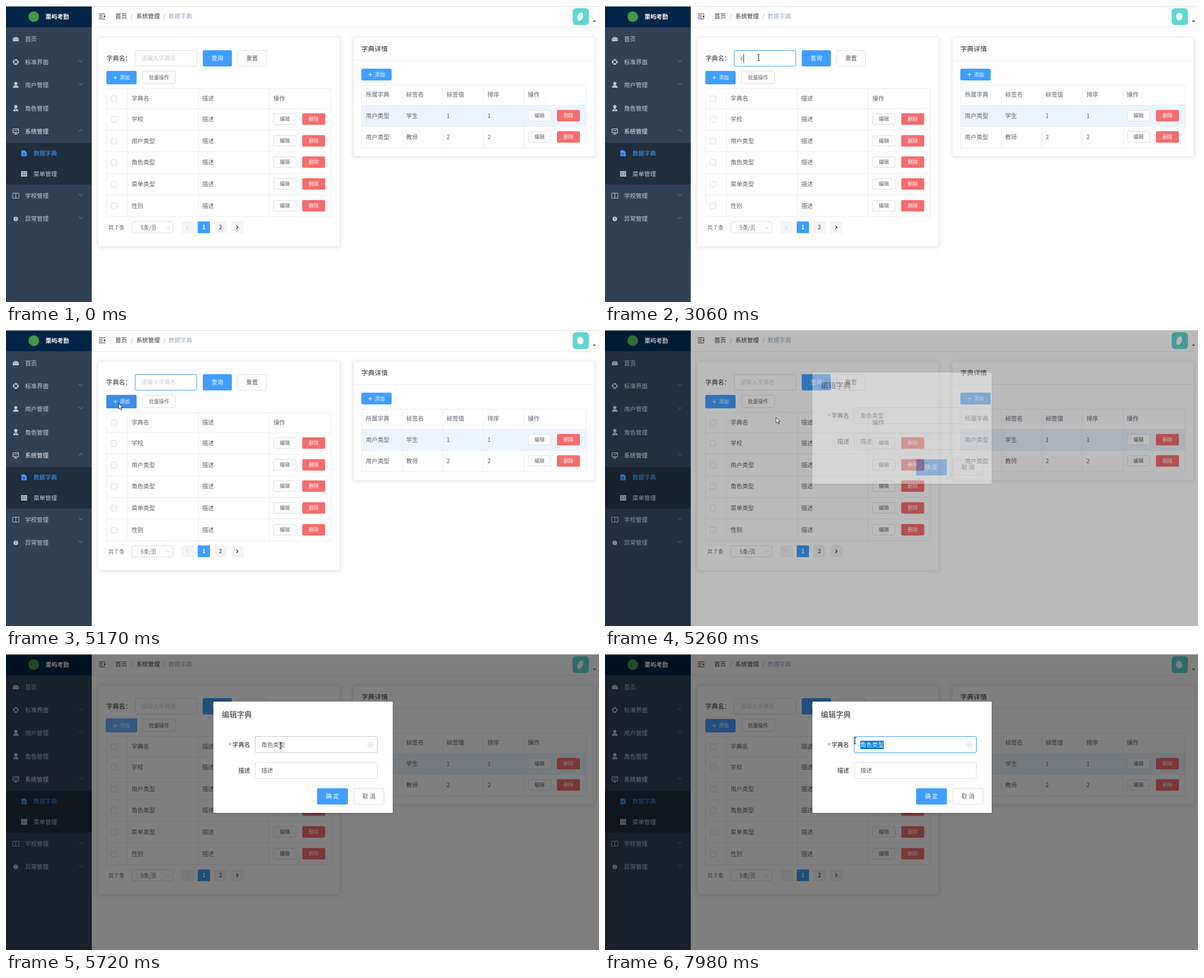
Animation, 1058 px wide and 529 px high, one loop 8000 ms. Source, as an HTML page:

```html
<!DOCTYPE html>
<html lang="zh">
<head>
<meta charset="utf-8">
<title>数据字典</title>
<style>
html, body { margin: 0; width: 100%; height: 100%; overflow: hidden; background: #fff; }
svg { display: block; width: 100%; height: 100vh; }
text { font-family: "Noto Sans CJK SC", "Noto Sans CJK", "Noto Sans", sans-serif; white-space: pre; }
.b { font-weight: 700; }
.m { text-anchor: middle; }
.card { filter: drop-shadow(0 1px 4px rgba(0, 0, 0, .12)); }
.panel { filter: drop-shadow(0 1px 1.5px rgba(0, 0, 0, .3)); }

.pointer, .arrow, .beam, .focus, .typed, .hint, .caret-a, .caret-b, .press, .held,
.shade, .dialog, .clear, .hover, .active, .marked { animation: 8s step-end infinite; }
.arrow, .beam, .focus, .typed, .caret-a, .caret-b, .press, .held,
.shade, .dialog, .clear, .hover, .active, .marked { opacity: 0; }

.pointer { animation-name: move; }
@keyframes move {
  0% { transform: translate(166px, 425px); }
  1.17% { transform: translate(166px, 425px); animation-timing-function: steps(7); }
  9.39% { transform: translate(274px, 92px); }
  54% { transform: translate(274px, 92px); animation-timing-function: steps(7); }
  62.25% { transform: translate(201px, 131px); }
  65.7% { transform: translate(305px, 156px); }
  67.05% { transform: translate(406px, 173px); }
  68.3% { transform: translate(455px, 170px); }
  69.5% { transform: translate(478px, 167px); }
  70.7% { transform: translate(490px, 164px); }
  75.2% { transform: translate(490px, 164px); animation-timing-function: steps(4); }
  80% { transform: translate(520px, 166px); }
  86% { transform: translate(520px, 166px); animation-timing-function: steps(6); }
  93% { transform: translate(503px, 160px); }
  95.1% { transform: translate(503px, 160px); animation-timing-function: steps(3); }
  98.7%, 100% { transform: translate(446px, 155px); }
}
.arrow { animation-name: arrow; }
@keyframes arrow { 0%, 9.39%, 68.3%, 100% { opacity: 0; } 1.17%, 57.5% { opacity: 1; } }
.beam { animation-name: beam; }
@keyframes beam { 0%, 57.5% { opacity: 0; } 9.39%, 68.3%, 100% { opacity: 1; } }

.focus { animation-name: focus; }
@keyframes focus { 0%, 65.7%, 100% { opacity: 0; } 12.9% { opacity: 1; } }
.typed { animation-name: typed; }
@keyframes typed { 0%, 46.3%, 100% { opacity: 0; } 23.4% { opacity: 1; } }
.hint { animation-name: hint; }
@keyframes hint { 0%, 46.3%, 100% { opacity: 1; } 23.4% { opacity: 0; } }
.caret-a { animation-name: caret-a; }
@keyframes caret-a { 0%, 19.4%, 52.8%, 100% { opacity: 0; } 12.9%, 46.3% { opacity: 1; } }
.caret-b { animation-name: caret-b; }
@keyframes caret-b { 0%, 30%, 43.2%, 100% { opacity: 0; } 23.4%, 36.6% { opacity: 1; } }

.press { animation-name: press; }
@keyframes press { 0%, 65.7%, 100% { opacity: 0; } 62.25% { opacity: 1; } }
.held { animation-name: held; }
@keyframes held { 0%, 95.1%, 100% { opacity: 0; } 67.05% { opacity: 1; } }

.shade { animation-name: shade; }
@keyframes shade {
  0% { opacity: 0; }
  65.7% { opacity: .27; }
  67.05% { opacity: .465; }
  68.3%, 100% { opacity: .5; }
}
.dialog { animation-name: dialog; }
@keyframes dialog {
  0% { opacity: 0; transform: translateY(-15px); }
  65.7% { opacity: .39; transform: translateY(-9px); }
  67.05% { opacity: .81; transform: translateY(-3px); }
  68.3% { opacity: .97; transform: translateY(-.5px); }
  69.5%, 100% { opacity: 1; transform: none; }
}
.clear, .hover { animation-name: clear; }
@keyframes clear { 0% { opacity: 0; } 68.3%, 100% { opacity: 1; } }
.active { animation-name: active; }
@keyframes active { 0% { opacity: 0; } 95.1%, 100% { opacity: 1; } }
.marked { animation-name: marked; }
@keyframes marked {
  0% { opacity: 0; clip-path: inset(0 0 0 75%); }
  96.3% { opacity: 1; clip-path: inset(0 0 0 75%); }
  97.5% { opacity: 1; clip-path: inset(0 0 0 25%); }
  98.7%, 100% { opacity: 1; clip-path: inset(0); }
}

.figure { transform-box: fill-box; transform-origin: center; animation: sway calc(8s / 17) step-end infinite; }
@keyframes sway {
  0%, 100% { transform: rotate(22deg); }
  20% { transform: rotate(8deg) scale(1.25, .85); }
  60% { transform: rotate(-8deg) scale(1.25, .85); }
}
</style>
</head>
<body>
<svg id="stage" viewBox="0 0 1058 529" preserveAspectRatio="none"></svg>
<script>
const BLUE = '#409eff', RED = '#f56c6c', TEXT = '#606266', DARK = '#303133',
      GREY = '#909399', LINE = '#ebeef5', EDGE = '#dcdfe6', MENU = '#bfcbd9';

const text = (x, y, s, fill = TEXT, size = 10.5, cls = '') =>
  `<text x="${x}" y="${y + size * .37}" font-size="${size}" fill="${fill}" class="${cls}">${s}</text>`;
const rect = (x, y, w, h, fill, r = 0, cls = '') =>
  `<rect x="${x}" y="${y}" width="${w}" height="${h}" rx="${r}" fill="${fill}" class="${cls}"/>`;
const frame = (x, y, w, h, edge = EDGE, r = 2.5, fill = '#fff', cls = '') =>
  `<rect x="${x + .5}" y="${y + .5}" width="${w - 1}" height="${h - 1}" rx="${r}" fill="${fill}" stroke="${edge}" class="${cls}"/>`;
const stroke = (d, color, width = 1, extra = '') =>
  `<path d="${d}" fill="none" stroke="${color}" stroke-width="${width}" ${extra}/>`;
const shape = (d, fill) => `<path d="${d}" fill="${fill}"/>`;
const dot = (x, y, r, fill) => `<circle cx="${x}" cy="${y}" r="${r}" fill="${fill}"/>`;
const group = (cls, ...parts) => `<g class="${cls}">${parts.join('')}</g>`;

const button = (x, y, w, h, s, fill, size = 10.5) =>
  (fill ? rect(x, y, w, h, fill, 2.5) : frame(x, y, w, h)) +
  text(x + w / 2, y + h / 2, s, fill ? '#fff' : TEXT, size, 'm');
const addLabel = (x, y) =>
  stroke(`M${x + 12.5} ${y}h7m-3.5-3.5v7`, '#fff', .9) + text(x + 24, y, '添加', '#fff', 9);
const rowButtons = (x, y) =>
  button(x, y - 10, 41, 20, '编辑', '', 9) + button(x + 51.5, y - 10.3, 41, 20.6, '删除', RED, 9);
const chevron = (x, y, dy, color, s = 3.5) =>
  stroke(`M${x - s} ${y - dy / 2}l${s} ${dy}l${s} ${-dy}`, color, .9);
const grid = (xs, ys) => {
  const left = xs[0], top = ys[0], w = xs.at(-1) - left + 1, h = ys.at(-1) - top + 1;
  return xs.map(x => rect(x, top, 1, h, LINE)).join('') + ys.map(y => rect(left, y, w, 1, LINE)).join('');
};

function sidebar() {
  const icons = {
    59: shape('M12.5 63a5.5 5.5 0 1 1 10 0z', MENU) + dot(15, 60, .8, '#304156') +
        dot(17.5, 57, .8, '#304156') + dot(20, 60, .8, '#304156'),
    100: `<circle cx="17.5" cy="100" r="3.8" fill="none" stroke="${MENU}" stroke-width="2.6" stroke-dasharray="4.97 1" stroke-dashoffset="2.5"/>`,
    141: dot(17.5, 138.5, 2.8, MENU) + shape('M12.5 146c0-6 10-6 10 0z', MENU),
    183: dot(17.5, 181, 2.4, MENU) + rect(14, 179, 7, 1.2, MENU) + rect(15.5, 177, 4, 2, MENU) +
         shape('M13 188c0-6 9-6 9 0z', MENU) + rect(17, 184, 1, 3, '#304156'),
    224: stroke('M12.5 219.5h10v7h-10zM17.5 226.5v2.5M14.5 229h6M14.5 224l2-2 2 1.5 2.5-3', '#f4f4f5', .9),
    339: stroke('M12 334.5h5.5v9H12zM17.5 334.5H23v9h-5.5z', MENU, .9),
    380: dot(17.5, 380.5, 4, MENU) + rect(17, 378, 1.1, 3, '#304156') + rect(17, 382, 1.1, 1.1, '#304156'),
  };
  const items = [[59, '首页'], [100, '标准界面', 1], [141, '用户管理', 1], [183, '角色管理'],
    [224, '系统管理', -1], [339, '学校管理', 1], [380, '异常管理', 1]];
  let out = rect(0, 0, 153, 529, '#304156') + rect(0, 0, 153, 38, '#012547') +
    dot(49.5, 19, 9.5, '#43974a') + text(70.5, 19, '栗屿考勤', '#fff', 10.5, 'b') +
    rect(0, 245, 153, 74, '#1f2d3d');
  for (const [y, name, fold] of items) {
    out += icons[y] + text(34, y, name, fold < 0 ? '#f4f4f5' : MENU);
    if (fold) out += chevron(133.5, y - 1.5, fold * 3.2, '#8592a2');
  }
  out += shape('M27.5 258h6l3.5 3.5v7h-9.5z', BLUE) + stroke('M29.5 263.5h5m-5 2.5h5', '#1f2d3d', .9) +
    text(49, 263.5, '数据字典', BLUE) + text(49, 300, '菜单管理', MENU);
  for (let i = 0; i < 9; i++) out += rect(27 + i % 3 * 3.7, 295 + (i / 3 | 0) * 3.5, 3.2, 3, MENU);
  return out;
}

function header() {
  return rect(153, 38, 905, 1, '#eceef0') +
    stroke('M165.5 14h11.5M165.5 17h7M165.5 20h7M165.5 23h11.5', DARK, 1.2) + shape('M177 16v5l-3-2.5z', DARK) +
    text(195, 18.5, '首页', DARK) + text(222.5, 18.5, '/', '#a9aeb8') +
    text(232.5, 18.5, '系统管理', DARK) + text(280.5, 18.5, '/', '#a9aeb8') +
    text(290, 18.5, '数据字典', '#97a8be') +
    rect(1011, 4, 29, 30, '#5fd7d3', 6) +
    '<ellipse class="figure" cx="1024.5" cy="19" rx="4.5" ry="8" fill="#fff"/>' +
    shape('M1047 26h6l-3 3.2z', '#5a5e66');
}

function dictionary() {
  const xs = [179, 216, 343, 469, 580], ys = [147, 183, 221, 260, 299, 337, 376];
  let out = group('card', frame(164, 56, 432, 374, LINE, 2)) +
    text(179, 93.5, '字典名：', DARK, 11.2) +
    frame(230, 79, 111, 29) + frame(230, 79, 111, 29, BLUE, 2.5, '#fff', 'focus') +
    text(241.5, 93.5, '请输入字典名', '#c8ccd4', 10.3, 'hint') + text(241.5, 93.5, 'c', TEXT, 10.5, 'typed') +
    rect(241, 86, 1, 15, '#333', 0, 'caret-a') + rect(247, 86, 1, 15, '#333', 0, 'caret-b') +
    button(351, 79, 52, 29, '查询', BLUE) + button(413, 79, 52, 29, '重置') +
    rect(179, 116, 54, 24, BLUE, 2.5) + rect(179, 116, 54, 24, '#3a8ee6', 2.5, 'press') +
    rect(178, 115, 56, 25, '#66b1ff', 2, 'held') + addLabel(179, 128) +
    button(243, 116, 60, 23, '批量操作', '', 9) + grid(xs, ys);
  ['字典名', '描述', '操作'].forEach((s, i) => out += text([224, 350, 477][i], 165, s, GREY, 10.5, 'b'));
  out += frame(187, 160, 11, 11, EDGE, 1.5);
  ['学校', '用户类型', '角色类型', '菜单类型', '性别'].forEach((s, i) => {
    const y = 202 + i * 38.7;
    out += frame(187, Math.round(y) - 5, 11, 11, EDGE, 1.5) + text(224, y, s) + text(350, y, '描述') +
      rowButtons(477, Math.round(y));
  });
  out += text(182.5, 396, '共 7 条', TEXT, 9.7) + frame(224, 385, 74, 21) +
    text(240, 396, '5条/页', TEXT, 9.7) + chevron(289, 396, 2.8, '#c0c4cc', 3);
  [313, 342, 372, 402].forEach((x, i) => out += rect(x, 385, 22, 21, i === 1 ? BLUE : '#f4f4f5', 1.5));
  return out + stroke('M325 392.5l-3 3 3 3', '#c0c4cc') + stroke('M411 392.5l3 3-3 3', DARK, 1.2) +
    text(353, 395.5, '1', '#fff', 9.7, 'b m') + text(382.5, 395.5, '2', TEXT, 9.7, 'b m');
}

function details() {
  const cells = [642, 714, 786, 859, 931];
  let out = group('card', frame(619, 56, 432, 213, LINE, 2)) + rect(619, 97, 431, 1, LINE) +
    text(634, 77, '字典详情', DARK, 11.8) + rect(634, 112, 54, 21, BLUE, 2.5) + addLabel(634, 122.5) +
    rect(634, 177, 401, 38, '#ecf5ff') + grid([634, 707, 779, 851, 924, 1035], [141, 177, 215, 253]);
  ['所属字典', '标签名', '标签值', '排序', '操作'].forEach((s, i) => out += text(cells[i], 158.5, s, GREY, 10.5, 'b'));
  ['学生', '教师'].forEach((s, i) => {
    const y = 196 + i * 38.5;
    ['用户类型', s, i + 1, i + 1].forEach((v, k) => out += text(cells[k], y, v));
    out += rowButtons(931.5, Math.floor(y));
  });
  return out;
}

function dialog() {
  return group('dialog',
    group('panel', rect(370, 85, 320, 199, '#fff', 1.5)),
    text(385, 108, '编辑字典', DARK, 13.4),
    text(397, 163, '*', RED, 10.5, 'b'), text(404, 162, '字典名', TEXT, 10.5, 'b'),
    text(414.5, 208, '描述', TEXT, 10.5, 'b'),
    frame(444, 147, 219, 30), frame(444, 147, 219, 30, '#c0c4cc', 2.5, '#fff', 'hover'),
    frame(444, 147, 219, 30, BLUE, 2.5, '#fff', 'active'),
    text(455.5, 162, '角色类型'),
    group('marked', rect(455.5, 155, 42, 15, '#0078d7'), text(455.5, 162, '角色类型', '#fff')),
    group('clear', '<circle cx="650" cy="161.5" r="4.4" fill="none" stroke="#c0c4cc" stroke-width=".9"/>',
      stroke('M648.4 159.9l3.2 3.2m0-3.2l-3.2 3.2', '#c0c4cc', .9)),
    frame(444, 193, 219, 30), text(455.5, 208.5, '描述'),
    button(555, 240, 55, 29, '确 定', BLUE), button(620, 240, 55, 29, '取 消'));
}

const pointer = group('pointer',
  '<path class="arrow" d="M0 0v10.4l2.4-2.2 1.7 4 1.7-.8-1.7-3.8h3.2z" fill="#fff" stroke="#111" stroke-width=".8"/>',
  '<path class="beam" d="M-2.3-5.5h1.6l.7.6.7-.6h1.6M0-5v10M-2.3 5.5h1.6l.7-.6.7.6h1.6" fill="none" stroke="#222"/>');

const topEdge = rect(0, 0, 1058, 1, '#dedede');

document.getElementById('stage').innerHTML = rect(0, 0, 1058, 529, '#fff') + header() + sidebar() +
  dictionary() + details() + rect(0, 0, 1058, 529, '#000', 0, 'shade') + dialog() + topEdge + pointer;
</script>
</body>
</html>
```
